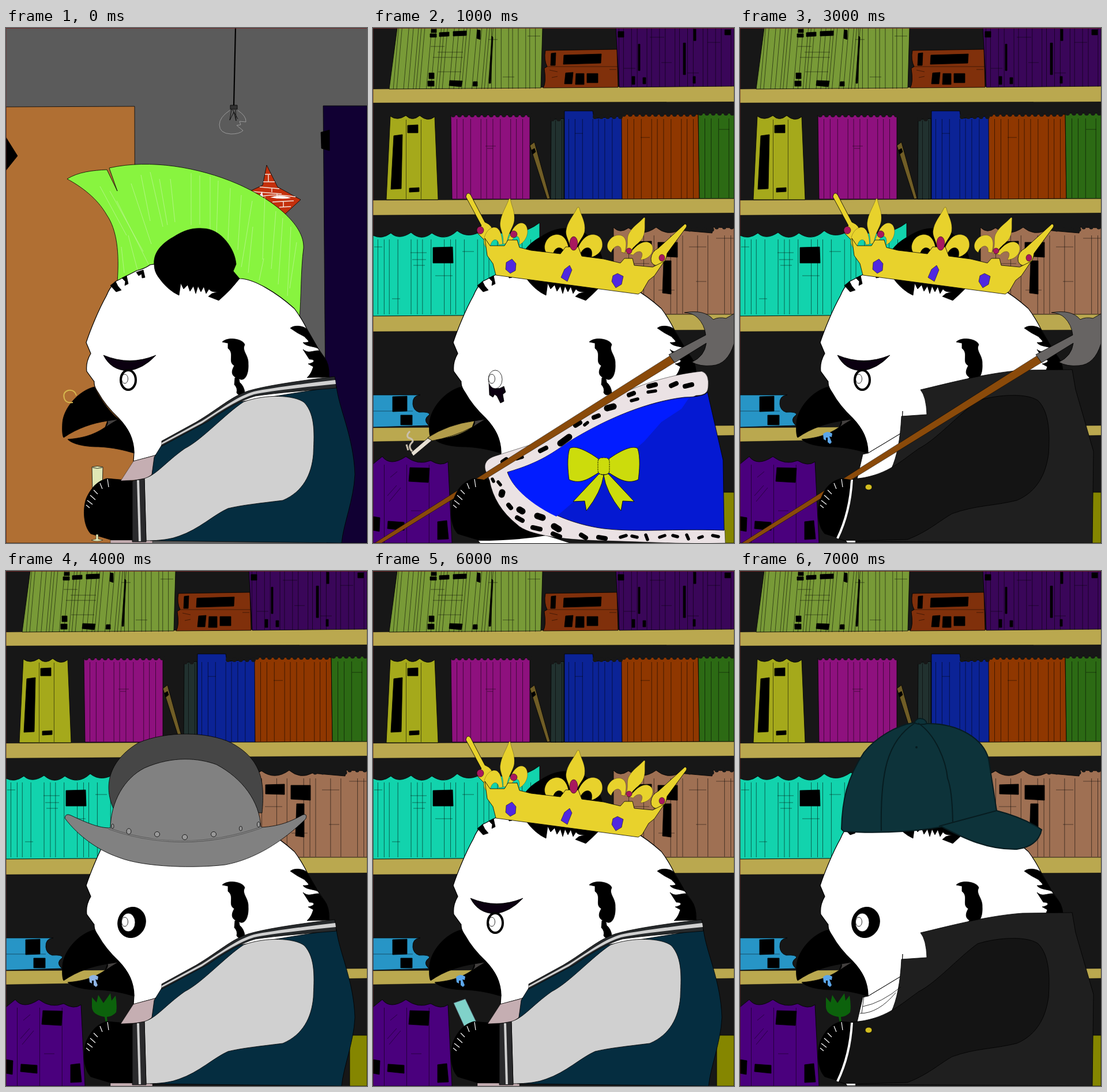
Write an HTML page without scripts that moves like this. It is 626 by 894 pixels and loops after 8 s.

```html
<!DOCTYPE html>
<html lang="en">
<head>
<meta charset="utf-8">
<title>Bird portraits</title>
<style>
html, body { margin: 0; width: 100%; height: 100%; overflow: hidden; background: #171717; }
svg { display: block; width: 100%; height: 100%; stroke: #000; stroke-width: .8; }
.look { visibility: hidden; animation: show 8s step-end infinite; animation-delay: calc(var(--n) * 1s - 8s); }
@keyframes show { 0% { visibility: visible; } 12.5%, 100% { visibility: hidden; } }
.flat { stroke: none; }
.line { fill: none; }
.scallop { fill: none; stroke: #171717; stroke-linecap: round; }
.spines { fill: none; stroke-opacity: .6; }
.ermine { fill: none; stroke-linecap: round; }
</style>
</head>
<body>
<svg viewBox="0 0 626 894" preserveAspectRatio="none">
<defs>
  <!-- Backdrops -->
  <g id="room">
    <path class="flat" fill="#5b5b5b" d="M0 0H626V894H0z"/>
    <path fill="#b06f33" d="M0 137L223 136L225 894H0z"/>
    <path d="M0 190L20 222L0 247z"/>
    <path fill="#110033" d="M550 135H626V894H556z"/>
    <path d="M546 181L561 177V213L547 209z"/>
    <path class="line" stroke-width="2.2" d="M398 0L395 135"/>
    <path fill="#333" d="M389 134H401V141H389z"/>
    <path class="line" d="M391 141L388 160L395 146L399 161L398 142M393 142L402 158"/>
    <path class="line" stroke="#aaa" d="M388 143Q370 155 370 168Q370 183 390 184Q405 184 411 178L400 169L407 168L405 162L416 163Q417 153 402 143"/>
    <path fill="#c4300c" d="M452 238L471 276L511 298L484 323L440 330L421 284L445 273z"/>
    <path class="line" stroke="#f3e2da" stroke-width="1.5" d="M449 254h10M446 267h20M440 276l34 3M428 284l50 4M440 293q20 -6 62 0M462 302l37 -2M474 311l20 -1M455 255v12M461 278v7M470 288v8M481 301v9"/>
    <path class="flat" fill="#fff" d="M438 294L444 284L446 294zM458 294Q475 288 494 295Q478 298 458 294z"/>
  </g>
  <g id="library">
    <path class="flat" fill="#171717" d="M0 0H626V894H0z"/>
    <g fill="#baa84f" stroke-width=".4">
      <path d="M0 106L626 100V128L0 130z"/>
      <path d="M0 299L626 296V321L0 325z"/>
      <path d="M0 500L626 496V524L0 527z"/>
      <path d="M0 694L626 690V707L0 718z"/>
    </g>
    <path fill="#789a37" d="M42 0H294L291 104L28 106z"/>
    <path fill="#80300b" d="M299 39L423 37L425 103L295 104Q301 95 297 70L302 67Q296 55 299 39z"/>
    <path fill="#3a0659" d="M421 0H626V101L427 103z"/>
    <path fill="#a5a91b" d="M30 153Q42 162 57 152Q68 163 81 152Q95 164 107 154L113 298H23z"/>
    <path fill="#8e117e" d="M135 151H272V297H137z"/>
    <path fill="#705d26" d="M272 204L280 198L307 296L302 297z"/>
    <path fill="#21312f" d="M309 159L331 157V297H308z"/>
    <path fill="#0b2396" d="M332 144H381L383 157L432 153V297H332z"/>
    <path fill="#8f3700" d="M431 150H564L566 296L432 297z"/>
    <path fill="#2c6a14" d="M564 148H626V296H566z"/>
    <path fill="#12d3ad" d="M0 360Q15 368 31 356Q45 369 66 355Q84 371 102 356Q125 372 146 352Q166 368 192 350Q250 368 289 338V498L0 500z"/>
    <path fill="#9f7053" d="M417 346Q428 358 443 347Q466 364 491 346Q510 362 531 351L588 356L590 346L626 347V497H417z"/>
    <path fill="#2795c6" d="M0 637H82Q68 638 69 653Q70 664 80 667Q98 666 98 671Q85 680 97 690L0 693z"/>
    <path fill="#4a007d" d="M0 757L16 744Q30 762 57 744Q78 760 100 751Q118 762 130 753L137 894H0z"/>
    <path fill="#858600" d="M596 806H626V894H596z"/>

    <g class="scallop">
      <path stroke-width="8" stroke-dasharray="0 11" d="M139 151H272M311 158H331M385 154H432M435 150H564M568 148H626"/>
      <path stroke-width="7" stroke-dasharray="0 13" d="M536 350H590M596 346H626"/>
    </g>
    <g class="spines">
      <path stroke-width="106" stroke-dasharray=".9 5 .9 11 .9 7 .9 8 .9 4" transform="translate(14) skewX(-5)" d="M30 53H196"/>
      <path stroke-width="105" stroke-dasharray=".9 6 .9 9 .9 12" d="M205 53H291"/>
      <path stroke-width="102" stroke-dasharray=".9 7 .9 13 .9 9 .9 16" d="M426 51H626"/>
      <path stroke-width="138" stroke-dasharray=".9 25" d="M57 228H108"/>
      <path stroke-width="138" stroke-dasharray=".9 10 .9 12 .9 17 .9 9" d="M145 227H272M316 229H331M339 227H432M441 227H564M575 226H626"/>
      <path stroke-width="130" stroke-dasharray=".9 10 .9 8 .9 14 .9 22" d="M8 432H289"/>
      <path stroke-width="136" stroke-dasharray=".9 25 .9 17 .9 28 .9 10 .9 9" d="M443 428H626"/>
      <path stroke-width="136" stroke-dasharray=".9 38" d="M19 826H130"/>
      <path d="M100 32h24M112 42h44M104 51h52M113 76h40M200 20h16M225 85h20M268 14h22M301 67H424M306 73l14 3M310 86l10 -2M410 72h12M435 70h20M480 16h25M500 60h18M580 25h22M545 78h20M65 390h28M68 402h24M70 412h20M2 380h14M108 430h30M155 388h20M33 470h14M449 409h30M452 476h30M495 455h28M548 380h30M595 365h30M560 440h18M195 205h18M198 209h10M350 183h14M464 190h16M600 176h18M0 665h69M25 812l16 -18M28 822l20 -24M30 780l12 -10M66 838h18"/>
    </g>
    <path d="M101 2h9v6h-9zM99 10h11v6h-11zM115 8l17 -1v7l-17 1zM139 6l23 -1v8l-23 1zM181 3l5 1v16l-6 -2zM206 14l2 2l-4 80h-3zM97 78h9v10h-9zM95 92h11v9h-11zM133 91l22 1l-2 10l-21 -2zM174 93h7v8h-8z
      M309 44l8 -1l-1 22h-8zM331 47l65 -2l-1 16l-65 2zM334 78l13 -1l-2 20h-13zM352 79h14v19h-15zM371 79h19v16h-19z
      M425 6h10v10h-10zM460 28h3v46h-3zM538 26h4v55h-4zM556 2h4v20h-4zM610 3h10v9h-10zM449 84h5v14h-5zM468 86h5v11h-5zM555 84h4v12h-4z
      M60 169l18 -1v14h-18zM36 187l15 -2l-2 94l-18 1zM63 278l17 -1v7l-17 1zM275 212l5 -3l2 6l-5 4z
      M104 381l34 -1l1 28h-35zM450 371l33 -1v18l-33 -1zM494 372h34v26l-34 -2zM504 404h13v58l-15 -2z
      M34 640l25 -1v26l-25 1zM48 672h20v17h-20zM64 763l34 1l-2 25l-34 -2zM0 848l12 2l-1 24l-11 -2zM26 856l28 2v14l-29 -3zM112 857l16 -2l3 32l-19 1z"/>
  </g>
  <g id="petals">
    <path d="M0 48Q-4 48 -6 54C-20 90 -45 115 -45 158C-43 190 -15 205 -11 260H11C15 205 43 190 45 158C45 115 20 90 6 54Q4 48 0 48z"/>
    <path id="leaf" d="M-15 260C-25 215 -45 175 -85 173C-120 173 -140 200 -139 228C-137 252 -118 270 -93 276C-97 250 -85 233 -68 233C-50 235 -43 248 -38 260z"/>
    <use href="#leaf" transform="scale(-1 1)"/>
  </g>
  <g id="lily">
    <use href="#petals"/>
    <path d="M-12 285C-15 305 -23 312 -22 322Q-10 345 0 360Q10 345 22 322C20 312 15 305 12 285z"/>
    <path id="curl" d="M-45 263C-70 258 -87 275 -87 295C-87 318 -70 328 -50 328C-30 328 -15 310 -12 285H-33C-35 297 -53 297 -53 283C-53 275 -48 276 -42 276z"/>
    <use href="#curl" transform="scale(-1 1)"/>
    <rect x="-49" y="259" width="98" height="26" rx="12"/>
  </g>
  <g id="lilies">
    <path class="flat" fill="#a6abc6" d="M0 0H626V894H0z"/>
    <g fill="#ffde00" stroke-width=".35"><use href="#lily" x="141" y="1"/><use href="#lily" x="484"/></g>
  </g>

  <!-- Bird -->
  <g id="bird">
    <path fill="#fff" stroke-width="1.2" d="M250 411Q240 418 227 421L190 440Q180 450 174 465C160 490 146 525 139 546L147 565Q138 580 140 596L153 614Q152 622 160 633Q172 655 195 677Q222 705 222 737L221 752L258 742L300 725L400 670L560 620V606Q561 584 552 572L541 556L521 521Q512 503 500 487C470 460 430 435 405 435L330 400z"/>
    <path d="M257 411C255 390 270 374 290 363C310 350 325 347 340 348C360 348 375 360 385 374C395 388 398 400 399 410L394 422L405 435Q390 455 369 473L351 466L357 461L368 458Q355 459 352 453L347 461L343 449L338 458L333 448L329 461L325 448L319 457L315 446L308 453L303 443L300 464Q280 455 264 432Q257 422 257 411z"/>
    <path d="M181 447L190 440L194 448L200 455L191 458zM201 434L209 430L212 444L206 447L207 440zM226 424L238 420L241 433L236 434L235 427L230 430z"/>
    <path d="M375 545C385 535 412 540 414 550C408 560 421 568 420 583C421 600 415 612 407 610C393 606 388 600 396 586C384 580 397 565 385 556V547zM397 607Q405 606 405 615Q413 622 414 633Q404 641 400 633Q402 625 396 619z"/>
    <path d="M493 521C500 515 515 517 521 522L541 556C532 552 520 553 515 546C532 546 522 542 518 536L505 529zM515 558C525 566 530 560 543 560L552 572Q561 584 560 606L522 607C530 600 532 590 533 588L524 583C536 581 537 575 526 575z"/>
    <path d="M153 623C125 630 100 660 98 685C97 700 98 708 100 711C125 694 150 686 176 682L172 693C150 708 130 712 107 714C115 722 135 727 160 727C185 728 205 733 222 738C220 708 212 695 195 679C175 662 162 640 153 623z"/>
    <path fill="#444140" d="M176 682L195 679Q183 686 171 694Q178 688 176 682z"/>
    <path d="M221 786L175 782C160 786 145 800 138 820C133 840 135 865 147 878L190 891L300 884L225 800z"/>
  </g>
  <g id="knuckles">
    <path class="flat" d="M138 822Q150 785 178 782L192 784L184 835z"/>
    <path class="line" stroke="#fff" stroke-width="1.2" d="M139 828l6 5M141 820l9 7M146 811l9 8M152 802l7 7M163 790l4 10M176 783l2 14"/>
  </g>
  <g id="iris" fill="#fff"><ellipse cx="212" cy="610" rx="12" ry="16"/><ellipse cx="206" cy="609" rx="5.5" ry="8"/></g>
  <g id="sad">
    <path fill="#0b0010" d="M169 568Q215 587 260 568Q238 592 211 595Q182 594 169 568z"/>
    <ellipse cx="212" cy="611" rx="13" ry="17" fill="#fff" stroke-width="4"/>
    <ellipse class="line" cx="206" cy="609" rx="5.5" ry="8"/>
  </g>
  <g id="weepy">
    <path fill="#0b0010" d="M201 617Q212 632 227 622L230 632L225 636L227 648L221 651L215 639L211 636L208 641L202 637z"/>
    <use href="#iris"/>
  </g>
  <g id="patch">
    <ellipse cx="218" cy="610" rx="24" ry="27" transform="rotate(20 218 610)"/>
    <use href="#iris"/>
  </g>
  <path id="drool" class="flat" d="M144 705Q151 698 160 704L159 710L155 709L159 719L156 722L152 719V711L149 711V716L145 714z"/>

  <!-- Clothes -->
  <g id="varsity">
    <path fill="#c5aeb2" stroke-width=".4" d="M221 752L259 742L253 775L240 784L199 786zM181 889H254V894H181z"/>
    <path fill="#052d40" d="M257 745L270 724L400 650L573 622C577 660 603 710 605 775C603 820 585 860 582 894L250 890L240 790L253 775z"/>
    <path fill="#26292b" d="M270 717L330 684C370 660 390 640 420 630Q460 618 570 605L573 625Q470 633 432 639Q400 648 350 683L270 726z"/>
    <path class="flat" fill="#d0d0d0" d="M270 720L340 682C380 657 400 640 430 631Q470 623 571 611L572 618Q460 629 430 636Q400 645 340 686L270 723z"/>
    <path fill="#d0d0d0" d="M240 782C262 775 275 755 310 730C340 715 380 670 412 649C450 635 500 637 517 650C538 672 534 710 533 740C530 775 515 805 480 820C440 825 410 828 385 834C360 845 335 870 300 882Q280 890 243 890z"/>
    <path fill="#2a2a2c" d="M219 786L240 782L243 892H219z"/>
    <path class="line" stroke="#d0d0d0" stroke-width="4" d="M229 785L232 891"/>
  </g>
  <g id="suit">
    <path fill="#fff" d="M282 665L280 703L222 738L213 740L203 783Q260 780 280 750z"/>
    <path class="line" d="M222 738L280 703"/>
    <path fill="#1f1f1f" d="M313 628C360 617 430 598 490 594L576 593L582 628Q600 690 613 735L611 894L185 891L168 886Q190 840 197 783Q241 781 262 766Q277 735 280 674L324 671Q323 640 313 628z"/>
    <path fill="#141414" d="M197 783C252 778 275 755 310 730C340 715 380 670 412 647C450 635 500 634 517 647C538 668 537 710 535 740C530 775 515 805 480 820C440 830 410 828 368 843C345 856 325 875 290 888L185 891L170 886Q192 840 197 783z"/>
    <path class="line" stroke="#fff" stroke-width="4" d="M194 784Q191 840 169 886"/>
    <path class="flat" fill="#fff" d="M184 890h16v3h-14z"/>
    <ellipse cx="223" cy="797" rx="6" ry="5" fill="#d2bd20"/>
  </g>
  <g id="robe">
    <path class="flat" fill="#fff" d="M183 890Q250 890 300 881L340 894H186z"/>
    <path fill="#ebe2e4" stroke-width=".5" d="M195 768Q190 750 212 743L300 715C340 690 380 660 430 635C480 612 530 600 570 596Q584 600 581 625Q580 638 560 638L440 700L610 871L611 894C540 896 470 892 400 890C340 889 270 882 250 862Q210 830 202 785z"/>
    <path fill="#0519d2" d="M233 771C290 755 315 735 340 718C410 675 480 648 540 641Q575 640 580 632L607 750L609 872C520 869 460 876 400 869C330 860 250 820 233 771z"/>
    <path class="flat" fill="#021cff" d="M234 771C290 755 315 735 340 718C410 675 480 648 548 642L535 661L500 684L470 718L318 848C270 825 240 795 234 771z"/>
    <g class="ermine">
      <path stroke-width="11" d="M325 721l15 -11M406 660l11 -3M224 806l-1 4M254 836l5 3M285 847l9 3M314 865l8 5"/>
      <path stroke-width="8" d="M225 753l6 -4M290 734l10 -5M351 690l8 -5M383 676l8 -3M444 637l8 -3M478 622l12 -3M517 621l9 -4M541 622l12 -3M235 828l4 5M250 850l9 5M277 867l13 3M312 878l12 5M361 880l8 5M391 884l12 2"/>
      <path stroke-width="5.5" d="M209 768l6 -2M249 748l10 -3M372 685l-5 4M448 647l11 -3M477 632l13 -2M207 783l2 4M217 788l4 5M429 884l10 -3M449 882l9 2M473 880l3 8M497 884l9 -3M520 881l8 2M544 880l3 7M565 885l6 -2M589 881l10 2"/>
    </g>
    <g fill="#ccdc0c">
      <g id="halfBow">
        <path d="M392 774L347 822L367 821L370 838Q396 805 400 776z"/>
        <path d="M391 748C370 733 350 724 341 730C336 745 338 770 340 784C360 793 375 782 391 772z"/>
      </g>
      <use href="#halfBow" transform="matrix(-1 0 0 1 800 0)"/>
      <rect x="390" y="746" width="20" height="29" rx="7" stroke-dasharray="3 1"/>
    </g>
  </g>

  <!-- Headwear -->
  <g id="mohawk">
    <path fill="#88f43f" d="M106 262C125 250 150 247 175 246L193 283L179 243C250 227 335 242 400 270C460 296 518 340 516 382C511 420 512 470 509 503L400 470L193 440C197 390 192 350 175 325C158 295 130 275 106 262z"/>
    <path class="line" stroke="#bdf594" d="M163 275l46 85M180 283l58 105M192 300l55 110M200 380l5 45M217 270l35 105M234 255l16 80M250 250l22 95M266 262l14 80M285 262l8 75M321 252v90M336 256v85M354 258v92M368 265l-3 95M389 278l-4 90M408 290l-6 95M427 300l-19 115M449 292l-4 110M468 318l-8 100M480 330l-8 115M494 345l-6 120M504 372l-12 80M447 400l-8 38M212 360l16 60M428 345l-8 80"/>
  </g>
  <g id="crown">
    <g fill="#e8d22c">
      <path d="M161 293Q163 283 169 289L194 337Q209 343 207 355Q204 366 193 368L182 357Q179 350 188 343z"/>
      <path d="M541 340Q547 342 541 349L510 391Q508 409 495 413Q481 412 482 400Q483 388 495 382z"/>
      <use href="#petals" transform="translate(237 296) rotate(-9) skewX(-15) scale(.275 .36) translate(0 -48)"/>
      <use href="#petals" transform="translate(471 329) rotate(14) skewX(-12) scale(.28 .32) translate(0 -48)"/>
      <use href="#petals" transform="translate(356 311) skewX(-7) scale(.36 .38) translate(0 -48)"/>
      <path d="M213 429L208 409L198 395L194 365L203 378L228 378L234 368H250L254 381L274 386L325 392L334 380H356L362 396L400 401L429 408L436 400H450L453 412L485 415L505 405L488 430L478 438L467 457L460 462z"/>
    </g>
    <g fill="#a8185f" stroke-width=".5">
      <ellipse cx="186" cy="351" rx="6" ry="6.5"/><circle cx="244" cy="358" r="6"/><ellipse cx="348" cy="374" rx="7" ry="12"/><circle cx="444" cy="387" r="5"/><ellipse cx="501" cy="399" rx="5" ry="6"/>
    </g>
    <path fill="#5028e0" stroke-width=".5" d="M231 407L241 401L248 409L247 421L238 426L230 419zM332 419L341 412L345 420L337 440L326 433zM424 426L434 431L431 445L421 451L414 440L416 430z"/>
  </g>
  <g id="hat">
    <path fill="#464646" d="M186 412C168 370 180 328 230 298C280 277 350 279 390 298C440 325 450 360 444 420z"/>
    <path fill="#818181" d="M181 446C182 400 205 360 240 342C290 320 335 325 365 336C410 360 440 400 442 445C480 443 500 431 515 423Q523 421 520 430C480 470 430 501 380 510C330 516 240 515 195 497C160 485 125 460 102 429Q103 420 112 424C150 442 165 446 181 446z"/>
    <path class="line" stroke-width="3" stroke="#555" d="M178 447C260 476 350 478 443 445"/>
    <path class="line" stroke="#aaa" d="M178 447C260 476 350 478 443 445"/>
    <g fill="#999"><ellipse cx="185" cy="443" rx="2" ry="4"/><ellipse cx="213" cy="452" rx="4" ry="5"/><circle cx="262" cy="457" r="4.5"/><circle cx="310" cy="462" r="4.5"/><circle cx="360" cy="457" r="4.5"/><ellipse cx="407" cy="447" rx="2.5" ry="4"/><ellipse cx="438" cy="440" rx="2.5" ry="4.5"/></g>
  </g>
  <g id="cap" stroke="#071c20" stroke-width="2" fill="#0d333a">
    <path d="M176 448C177 400 185 360 215 315C235 290 270 268 303 263C305 253 322 254 324 265C380 264 422 292 431 326L445 416C480 425 505 437 523 449Q517 478 480 483C430 484 390 465 350 444C290 455 220 455 180 452z"/>
    <path class="line" d="M245 451C243 350 255 295 303 264Q313 268 324 265M309 264C340 285 357 330 360 360Q368 380 369 437M345 443L445 416"/>
    <circle cx="306" cy="306" r="1"/>
  </g>

  <!-- Props -->
  <g id="glass" fill="#dfe6b4">
    <path d="M149 762Q158 759 168 762L167 806H150z"/>
    <path class="line" d="M150 763Q158 766 167 763"/>
  </g>
  <path id="glassFoot" fill="#dfe6b4" stroke-width=".5" d="M156 879h4v8l8 2q-10 4 -20 0l8 -2z"/>
  <path id="noseRing" class="line" stroke="#d6b84e" stroke-width="2" d="M116 650Q104 652 101 643Q98 632 108 629Q119 627 122 638"/>
  <path id="plant" class="flat" fill="#0c620c" d="M149 740L157 749L160 736L169 750L181 733L183 746L190 737Q193 755 191 766Q185 773 175 774L177 796L173 784L171 774Q148 770 149 755z"/>
  <path id="bottle" fill="#80d2ca" stroke="#567" d="M140 750L160 743L179 783L172 798L160 794z"/>
  <g id="halberd">
    <path fill="#8a4a0a" stroke-width=".5" d="M3 894H15L524 580L515 569z"/>
    <path fill="#676463" d="M513 567L577 533Q575 515 563 503Q555 495 540 494Q575 488 590 506Q600 501 612 504L626 496V548Q615 584 588 586Q567 588 553 580Q575 570 578 547L523 581z"/>
  </g>
  <g id="cigarette">
    <path fill="#b39d4a" d="M95 711Q130 688 176 682L172 693Q140 710 100 717z"/>
    <path fill="#e6dfd2" d="M95 712L66 737L70 743L102 716z"/>
    <path class="line" stroke="#c9bfae" stroke-width="3" d="M68 735q-8 -8 -1 -15q6 -5 -6 -9q-4 -4 3 -11M61 733l-3 -10"/>
  </g>
  <path id="frame" class="line" stroke="#7a2020" d="M0 894V.5H626"/>
</defs>

<g class="look" style="--n:0">
  <use href="#room"/><use href="#mohawk"/><use href="#glass"/><use href="#bird"/><use href="#sad"/><use href="#varsity"/><use href="#noseRing"/><use href="#knuckles"/><use href="#glassFoot"/>
</g>
<g class="look" style="--n:1">
  <use href="#library"/><use href="#bird"/><use href="#weepy"/><use href="#robe"/><use href="#crown"/><use href="#cigarette"/><use href="#halberd"/><use href="#knuckles"/>
</g>
<g class="look" style="--n:2">
  <use href="#library"/><use href="#plant"/><use href="#bird"/><use href="#patch"/><use href="#suit"/><use href="#crown"/><use href="#drool" fill="#5ba6ea"/><use href="#knuckles"/>
</g>
<g class="look" style="--n:3">
  <use href="#library"/><use href="#bird"/><use href="#sad"/><use href="#suit"/><use href="#crown"/><use href="#drool" fill="#5ba6ea"/><use href="#halberd"/><use href="#knuckles"/>
</g>
<g class="look" style="--n:4">
  <use href="#library"/><use href="#plant"/><use href="#bird"/><use href="#patch"/><use href="#varsity"/><use href="#hat"/><use href="#drool" fill="#8eb4e4"/><use href="#knuckles"/>
</g>
<g class="look" style="--n:5">
  <use href="#lilies"/><use href="#bottle"/><use href="#bird"/><use href="#weepy"/><use href="#robe"/><use href="#crown"/><use href="#drool" fill="#7ab7ec"/><use href="#knuckles"/>
</g>
<g class="look" style="--n:6">
  <use href="#library"/><use href="#bottle"/><use href="#bird"/><use href="#sad"/><use href="#varsity"/><use href="#crown"/><use href="#drool" fill="#5ba6ea"/><use href="#knuckles"/>
</g>
<g class="look" style="--n:7">
  <use href="#library"/><use href="#plant"/><use href="#bird"/><use href="#patch"/><use href="#suit"/><use href="#cap"/><use href="#drool" fill="#5ba6ea"/><use href="#knuckles"/>
  <path class="line" d="M215 738L211 768M213 756Q245 750 279 722M208 768Q240 768 270 732"/>
</g>
<use href="#frame"/>
</svg>
</body>
</html>
```
